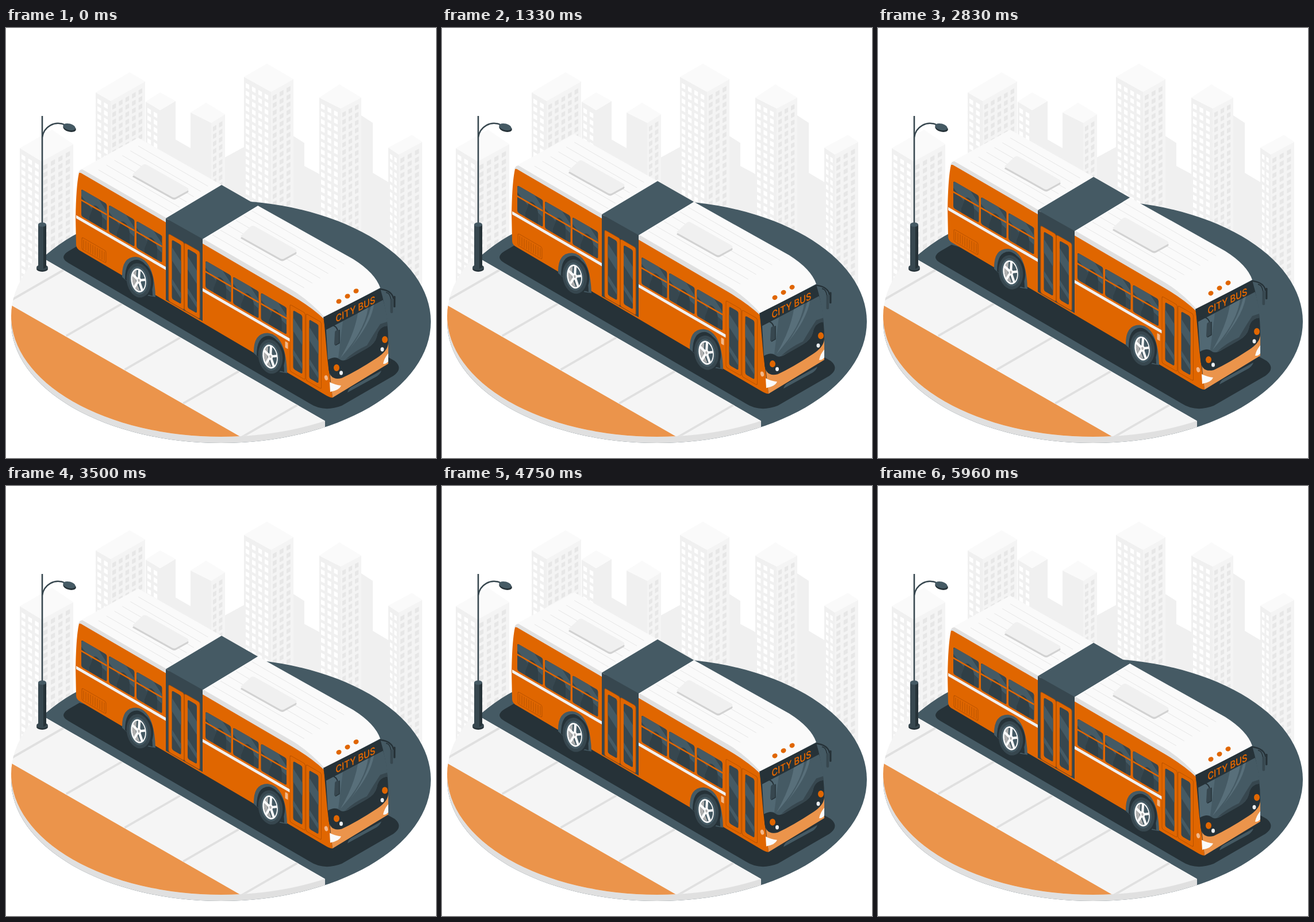
Recreate the animation shown at these times as an HTML page. Size 748 by 748 pixels, loop 6000 ms.

```html
<!DOCTYPE html>
<html lang="en">
<head>
<meta charset="utf-8">
<title>City bus</title>
<style>
  html, body { margin: 0; width: 100%; height: 100%; overflow: hidden; background: #fff; }
  svg { display: block; width: 100vw; height: 100vh; }
</style>
</head>
<body>
<svg id="stage" viewBox="0 0 748 748"></svg>
<script>
const LOOP = 6000, LIFT = 14.96, SLOPE = 0.577;
const C = {
  orange: '#e06600', pale: '#eb944b', seam: '#b85200', ink: '#263238',
  slate: '#37474f', steel: '#455a64', white: '#fafafa', grey: '#e0e0e0'
};

const path = (d, fill, extra = '') => `<path d="${d}" fill="${fill}" ${extra}/>`;
const line = (d, color, width, extra = '') =>
  `<path d="${d}" fill="none" stroke="${color}" stroke-width="${width}" ${extra}/>`;
const ellipse = (x, y, rx, ry, fill, extra = '') =>
  `<ellipse cx="${x}" cy="${y}" rx="${rx}" ry="${ry}" fill="${fill}" ${extra}/>`;
const rect = (x, y, w, h, fill, r = 0, extra = '') =>
  `<rect x="${x}" y="${y}" width="${w}" height="${h}" rx="${r}" fill="${fill}" ${extra}/>`;
const times = (n, draw) => Array.from({ length: n }, (_, i) => draw(i)).join('');

// One wall of a tower, with a regular grid of windows following its slope.
function wall(x1, y1, x2, y2, fill, glass, cols) {
  const slope = (y2 - y1) / (x2 - x1), pitch = (x2 - x1 - 3) / cols;
  let holes = '';
  for (let c = 0; c < cols; c++) {
    const x = x1 + 3 + c * pitch, w = pitch * 0.56;
    for (let y = y1 + (x - x1) * slope + 9; y < 440; y += 13.2)
      holes += `M${x} ${y}l${w} ${w * slope}v8l${-w} ${-w * slope}z`;
  }
  return path(`M${x1} ${y1}L${x2} ${y2}V445H${x1}Z`, fill) + (holes && path(holes, glass));
}

function tower([lx, ly, tx, ty, rx, ry, cx, cy, left, right]) {
  return wall(lx, ly, cx, cy, '#f0f0f0', '#fff', left) +
    wall(cx, cy, rx, ry, right ? '#f4f4f4' : '#f0f0f0', '#e7e7e7', right) +
    path(`M${lx} ${ly}L${tx} ${ty}L${rx} ${ry}L${cx} ${cy}Z`, '#fafafa');
}

function city() {
  const towers = [
    [24, 209, 80, 177, 117, 202, 62, 232, 3, 4],
    [243, 128, 268, 112, 295, 127, 268, 143, 2, 0],
    [156, 112, 215, 77, 242, 93, 182, 127, 2, 5],
    [321, 147, 348, 130, 381, 150, 357, 165, 0, 2],
    [414, 85, 454, 62, 500, 89, 461, 111, 4, 3],
    [545, 121, 580, 98, 618, 121, 582, 140, 3, 3],
    [665, 208, 706, 186, 724, 198, 683, 220, 2, 3]
  ];
  return path('M243 180L295 194L321 209L381 225L414 207L500 188L519 200V240L545 254L618 152L638 165V252L665 268V400H243Z', '#f0f0f0') +
    towers.map(tower).join('');
}

function ground() {
  const joints = times(5, i => `M${100 + i * 101.7} ${421 + i * 58.7}l-97 56`);
  const base = fill => ellipse(374, 511, 365, 211, fill);
  return base(C.steel) +
    '<g clip-path="url(#kerb)">' + base(C.grey) +
    ellipse(374, 501, 365, 210, '#f5f5f5') +
    '<g clip-path="url(#pavement)">' + line(joints, C.grey, 3.8) +
    path('M0 477L420 718H0Z', C.pale) + '</g></g>' +
    path('M128 377L109 388Q91 399 109 409L528 653Q553 669 584 657L674 605Q692 592 676 579L660 570L560 500Z', C.ink);
}

function lamp() {
  return line('M63 153V345', C.slate, 2.6) +
    line('M63 190C66 172 84 160 104 169', C.slate, 2.4) +
    ellipse(110.5, 174.5, 11.5, 6, C.ink, 'transform="rotate(14 110.5 174.5)"') +
    ellipse(110, 172, 11, 5.6, C.steel, 'transform="rotate(14 110 172)"') +
    ellipse(63, 419, 10, 5, C.ink) + ellipse(63, 416.5, 10, 5, C.slate) +
    path('M56 342V416Q63 421 70 416V342Z', C.slate) +
    path('M65 342V419L70 416V342Z', C.ink) +
    ellipse(63, 342, 7, 3.8, C.steel);
}

function hatch(x, y) {
  const top = `M${x + 3} ${y - 3}L${x + 19} ${y - 18}Q${x + 22} ${y - 20} ${x + 26} ${y - 18}` +
    `L${x + 97} ${y + 22}Q${x + 100} ${y + 25} ${x + 97} ${y + 27}L${x + 77} ${y + 38}` +
    `Q${x + 74} ${y + 40} ${x + 70} ${y + 38}L${x + 2} ${y}Q${x} ${y - 1} ${x + 3} ${y - 3}Z`;
  return path(top, '#d2d2d2', 'transform="translate(0 3.5)"') + path(top, '#f0f0f0');
}

// Thin ribs running lengthwise between the near and far roof edges.
function ribs(x, y, near, far) {
  return line(times(6, i => {
    const k = (i + 1) / 7, len = near + (far - near) * k;
    return `M${x + 97 * k} ${y - 58 * k}l${len} ${len * SLOPE}`;
  }), '#e6e6e6', 1);
}

function roof() {
  return path('M128 247L230 191L375 273L278 338Z', C.white) +
    path('M126 252Q128 246 133 246L278 330V339L130 254Z', C.grey) +
    ribs(147, 255, 130, 120) + hatch(219, 256) +
    path('M342 367L438 309L604 402Q642 426 651 452L553 504Q528 480 500 463Z', C.white) +
    path('M342 366L498 456Q528 474 554 503L552 507Q528 487 498 467L342 377Z', C.grey) +
    ribs(345, 368, 160, 160) + hatch(407, 363) +
    path('M278 331L375 273L438 309L342 367Z', C.steel);
}

// The helpers below draw in side-wall space: x from the rear, y measured at the rear.
function pane(x) {
  return `<g transform="translate(${x} 275)">` +
    rect(0, 0, 44.5, 47, C.slate, 3) +
    path('M3 0H30L44.5 14V30L36 27Q34 14 26 14Q20 15 18 24L0 12V3Z', C.steel) +
    path('M14 47V40L20 22Q24 12 31 17L36 25V47Z', C.ink, 'opacity=".4"') +
    rect(0, 17.5, 44.5, 3, C.orange) + '</g>';
}

function doorLeaf(x, y) {
  const h = 382 - y;
  return rect(x, y, 26.5, h, C.orange, 3, `stroke="${C.seam}" stroke-width="1"`) +
    rect(x + 5.5, y + 7, 16, h - 14, C.slate, 3) +
    path(`M${x + 5.5} ${y + 20}l16 16v23l-16 -16zM${x + 5.5} ${y + 75}l16 16v10l-16 -16z`, C.steel);
}

function side() {
  const slits = times(10, i => `M${13 + i * 4} 361v16`);
  return path('M127 252L130 252L278 338L342 375L498 466Q532 486 553 506L559 575L568 643Q563 643 555 638L130 388Q122 384 122 377L121 330Q122 274 127 252Z', C.orange) +
    path('M278 331L342 367V510L278 473Z', C.slate) +
    `<g transform="translate(122 0) matrix(1 ${SLOPE} 0 1 0 0)">` +
    rect(0, 325.5, 156, 5.5, '#f0f0f0') + rect(220, 325.5, 152, 5.5, '#f0f0f0') +
    [9, 57, 105, 225, 273, 321.5].map(pane).join('') +
    rect(10, 358, 42, 21, 'none', 3, `stroke="${C.seam}" stroke-width="1"`) +
    line(slits, C.seam, 1) +
    doorLeaf(161, 265) + doorLeaf(188.5, 265) +
    doorLeaf(372, 266) + doorLeaf(400, 266) +
    rect(363.5, 335, 5, 11, '#f3b788', 1) + '</g>';
}

function wheel(x, y) {
  const spokes = times(5, i => {
    const a = (i * 72 - 70) * Math.PI / 180;
    return `M0 0L${12 * Math.cos(a)} ${20 * Math.sin(a)}`;
  });
  return `<g transform="translate(${x} ${y})">` +
    path('M-29 -6Q-30 -41 -5 -41Q27 -38 29 29L5 25Z', C.steel) +
    path('M-24 -2Q-24 -36 -3 -36Q22 -33 24 27L0 20Z', C.ink) +
    '<g transform="rotate(-9)">' +
    ellipse(3, 0, 22, 31, C.ink) + ellipse(0, 0, 21, 30, C.slate) +
    ellipse(-.5, 0, 16, 24.5, C.steel) +
    ellipse(-.5, 0, 13, 21, C.white) + ellipse(0, 0, 10.8, 18.2, C.steel) +
    path('M-1 -18Q-11 -15 -11 0Q-10 15 -1 18L-5 0Z', '#b0b0b0') +
    line(spokes, C.white, 4.2) + ellipse(0, 0, 4.2, 5.4, C.white) +
    ellipse(0, 0, 1.8, 2.6, '#b0b0b0') + '</g></g>';
}

function front() {
  return path('M568 643L665 584V545L563 598Z', C.pale) +
    path('M552 503L651 453Q665 500 665 548Q664 562 645 574Q610 597 584 609Q563 614 561 592Q559 540 552 503Z', C.ink) +
    path('M557 525L656 473Q662 492 664 518Q648 519 645 537Q642 549 628 557L600 573Q586 582 580 576Q572 570 560 577Z', C.steel) +
    path('M590 577Q606 562 628 552Q641 530 651 515L663 511L664 518Q648 519 645 537Q642 549 628 557L600 573Z', C.slate) +
    path('M557 525L586 510L578 574Q571 571 560 577Z', '#607985', 'opacity=".45"') +
    path('M612 496L630 486Q625 522 592 562L582 574Q607 530 612 496ZM635 484L640 481Q636 510 606 548L600 556Q628 516 635 484Z', '#6d8490', 'opacity=".5"') +
    ellipse(575, 591, 5, 6, C.orange) + ellipse(659, 542, 5, 6, C.orange) +
    ellipse(583, 600, 3, 3.7, '#eceff1') + ellipse(654.5, 559, 3, 3.7, '#eceff1') +
    ellipse(557, 608.5, 3, 4.5, '#f3b788', 'transform="rotate(-15 557 608.5)"') +
    path('M563 616Q573 621 583 622Q580 630 564 633Z', C.white) +
    path('M665 566V580Q661 585 656 584Q658 574 665 566Z', C.white) +
    path('M594 634Q596 627 602 624L653 596Q651 602 645 606Z', C.steel) +
    [[579, 475.5], [594, 466.5], [609, 457.5]].map(([x, y]) =>
      ellipse(x, y, 4.6, 4, C.orange, `transform="rotate(-25 ${x} ${y})"`)).join('') +
    `<text transform="matrix(.84 -.42 .02 1 573.5 512.5)" font-family="Inter, Roboto, sans-serif" font-size="17.5" font-weight="600" fill="${C.orange}">CITY BUS</text>` +
    line('M651 454Q672 457 674 471', C.ink, 2.4) + line('M661 460Q669 461 670 476', C.ink, 1.6) +
    rect(668.5, 471, 4.6, 25, C.slate, 2) + rect(674, 466, 3.5, 20, C.ink, 1.5) +
    line('M560 516Q576 516 577 528', C.ink, 2) +
    path('M572 530Q572 526 576 526L580 525V548L573 552Q571 552 571 549Z', C.slate) +
    line('M580 525V548L573 552', C.ink, 1.4);
}

document.getElementById('stage').innerHTML =
  '<defs><clipPath id="kerb"><path d="M0 363.3L555 683.5V748H0Z"/></clipPath>' +
  '<clipPath id="pavement"><ellipse cx="374" cy="501" rx="365" ry="210"/></clipPath></defs>' +
  city() + ground() + lamp() +
  '<g id="bus">' + roof() + side() + wheel(231, 439) + wheel(460, 571.5) + front() + '</g>';

const bus = document.getElementById('bus');

// The bus rises and sinks at a steady speed.
function render(now) {
  const phase = now % LOOP / LOOP;
  const lift = LIFT * (1 - Math.abs(1 - 2 * phase));
  bus.setAttribute('transform', `translate(0 ${-lift.toFixed(2)})`);
}

let start;
function tick(now) {
  start ??= now;
  render(now - start);
  requestAnimationFrame(tick);
}
render(0);
requestAnimationFrame(tick);
</script>
</body>
</html>
```
